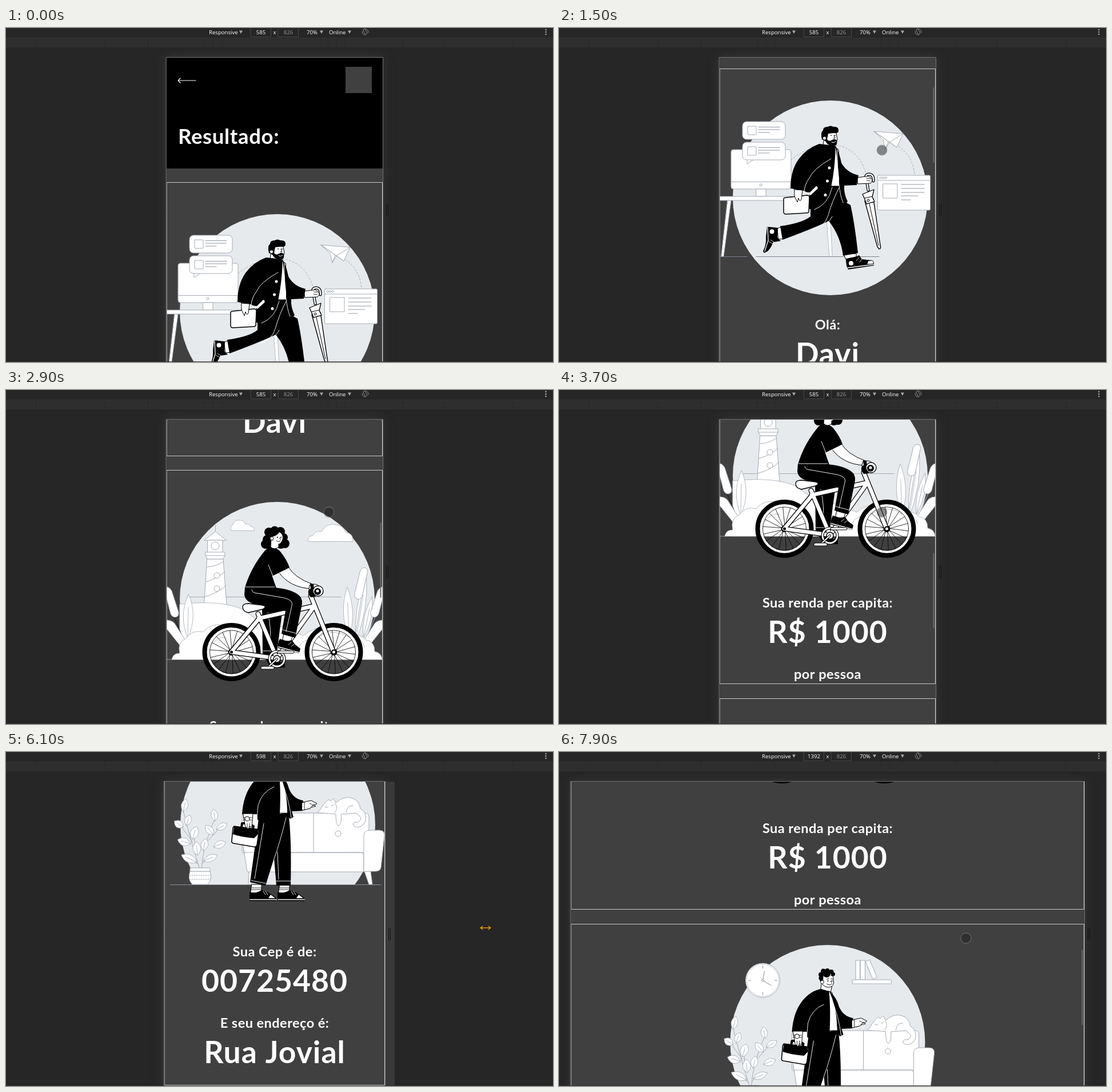
An HTML page with a canvas that plays this animation: 957x585 px, repeating every 8 s.

```html
<!DOCTYPE html>
<html lang="pt">
<head>
<meta charset="utf-8">
<title>Resultado</title>
<style>
html, body { margin: 0; width: 100%; height: 100%; overflow: hidden; background: #262626; }
canvas { display: block; width: 957px; height: 585px; }
</style>
</head>
<body>
<canvas id="stage" width="957" height="585"></canvas>
<script>
const ctx = document.getElementById('stage').getContext('2d');
const LOOP = 8000, MID = 470, TOP = 51, PAGE = '#404040', DESK = '#262626';
const PALE = '#e7eaed', WHITE = '#fff', BLACK = '#000', EDGE = '#a5abb5';

// [time, value...] keys
const scrollKeys = [[1100, 0], [1200, 25], [1500, 199], [1700, 282], [1900, 282], [2000, 330], [2100, 365],
  [2200, 365], [2300, 430], [2700, 665], [2800, 665], [2900, 714], [3100, 820], [3500, 892], [3600, 892],
  [3700, 930], [3900, 1075], [4000, 1075], [4100, 1145], [4400, 1425], [4600, 1425], [4700, 1494], [4900, 1569]];
const wideScrollKeys = [[7400, 1511], [7500, 1465], [7700, 1290], [7900, 1131]];
const widthKeys = [[5900, 585], [6000, 590], [6100, 598], [6200, 690], [6500, 1060], [6800, 1354], [7000, 1375], [7300, 1392]];
const cursorKeys = [[200, 362, 575], [400, 410, 420], [700, 600, 90], [1000, 565, 214], [5200, 565, 214], [5500, 682, 308],
  [5900, 682, 308], [6000, 750, 308], [6100, 839, 308], [6400, 926, 308], [7300, 933, 308], [7400, 712, 326]];

function at(keys, t, i = 1) {
  if (t <= keys[0][0]) return keys[0][i];
  for (let k = 1; k < keys.length; k++) {
    const a = keys[k - 1], b = keys[k];
    if (t <= b[0]) return a[i] + (b[i] - a[i]) * (t - a[0]) / (b[0] - a[0]);
  }
  return keys[keys.length - 1][i];
}

const paths = new Map();
function ink(d, fill, stroke, w = 1) {
  if (!paths.has(d)) paths.set(d, new Path2D(d));
  paint(paths.get(d), fill, stroke, w);
}
function paint(p, fill, stroke, w = 1) {
  if (fill) { ctx.fillStyle = fill; ctx.fill(p); }
  if (stroke) { ctx.strokeStyle = stroke; ctx.lineWidth = w; ctx.stroke(p); }
}
function dot(x, y, r, fill, stroke, w) {
  const p = new Path2D();
  p.arc(x, y, r, 0, 7);
  paint(p, fill, stroke, w);
}
function box(x, y, w, h, r, fill, stroke, lw) {
  const p = new Path2D();
  p.roundRect(x, y, w, h, r);
  paint(p, fill, stroke, lw);
}
function rect(x, y, w, h, c) { ctx.fillStyle = c; ctx.fillRect(x, y, w, h); }
function text(s, x, y, size, { color = WHITE, font = 'Lato', weight = 700, align = 'center', spacing = .018 } = {}) {
  ctx.font = `${weight} ${size}px ${font}, sans-serif`;
  ctx.letterSpacing = `${size * spacing}px`;
  ctx.fillStyle = color;
  ctx.textAlign = align;
  ctx.fillText(s, x, y);
}
function disc(y, floor) {
  ctx.save();
  ctx.beginPath();
  ctx.rect(280, y - 180, 400, floor - y + 180);
  ctx.clip();
  dot(474.5, y, 170.5, PALE);
  ctx.restore();
}
function leaf(x, y, len, wide, deg) {
  ctx.save();
  ctx.translate(x, y);
  ctx.rotate(deg * Math.PI / 180);
  const p = new Path2D(`M0 0Q${-wide} ${-len * .5} 0 ${-len}Q${wide} ${-len * .5} 0 0V${-len * .7}`);
  paint(p, WHITE, EDGE, .8);
  ctx.restore();
}

function runner() {
  disc(297.5, 480);
  ctx.setLineDash([3, 3]);
  ink('M406 231Q440 203 484 205Q526 212 538 258M594 207Q620 225 622 258', null, '#a2a6ab', .9);
  ctx.setLineDash([]);
  ink('M282 400.5H329M345 400.5H560', null, '#7b8190');
  ink('M468 334L473 400H478L475 335Z', WHITE, EDGE, .8);

  box(301, 213, 105, 69, 4, WHITE, EDGE);
  ink('M301 269.5H406', null, EDGE);
  dot(353, 275, 2, null, EDGE);
  box(345, 282, 17, 13, 0, WHITE, EDGE);
  ink('M295 302H301L288 400H284Z', WHITE, EDGE);
  box(281.5, 295, 125, 7, 1, WHITE, EDGE);
  ink('M329 230V238L341 230', WHITE, EDGE);
  for (const y of [164, 200]) {
    box(321, y, 75, 31, 7, WHITE, EDGE);
    box(330, y + 8, 15, 15, 1, null, EDGE);
    ink(`M349 ${y + 9.5}H386M349 ${y + 14}H386M349 ${y + 19}H368`, null, '#9097a5');
  }

  ink('M551 181L602 185L591 209L578 200L571 212L567 196Z', WHITE, EDGE);
  ink('M551 181L578 200L602 185M551 181L591 209M571 212L576 199', null, EDGE);

  box(557.5, 258, 92, 61, 2, WHITE, EDGE);
  ink('M558 267H649', null, EDGE);
  for (const x of [562.5, 567, 571.5]) dot(x, 262.5, 1.7, null, EDGE);
  box(567, 273, 25, 25, 0, null, EDGE);
  ink('M599 274H639M599 281H639M599 288H639M599 294H628M599 301H615', null, '#9097a5');

  // umbrella
  ink('M541 284L538 266Q534 257 542 256Q551 256 550 268', null, BLACK, 5);
  ink('M541 284L538 266Q534 257 542 256Q551 256 550 268', null, WHITE, 2.4);
  ink('M535 303L550 299L562 380Q564 387 560 387L557 383Z', WHITE, BLACK, 1.4);
  ink('M531 291L551 283L548 296L552 304L538 308L535 300Z', WHITE, BLACK, 1.3);
  ink('M535 298L548 295M543 308L559 381', null, BLACK);
  dot(541, 302, 2, WHITE, BLACK);
  ink('M522 262L537 260Q541 258 545 262Q551 267 545 272L523 273Z', WHITE, BLACK);
  ink('M538 263L545 264M538 267L545 268', null, BLACK, .8);

  // legs and shoes
  ink('M382 351L390 348L394 369L384 370Z', WHITE, BLACK);
  ink('M364 348L383 350L382 367L388 373L375 375Q371 385 365 391L359 394L357 391Q363 380 362 366Z', BLACK);
  ink('M365 349L366 372L360 391', null, WHITE, 1.3);
  ink('M367 374L374 378M370 371L376 375', null, WHITE, .8);
  dot(372.5, 356.5, 4, WHITE);
  ink('M499 397L520 395V402L502 405Z', WHITE, BLACK);
  ink('M502 404L521 400L525 398L530 405L548 407Q552 411 551 416L506 423Q502 418 502 404Z', BLACK);
  ink('M505 420L551 414', null, WHITE, 1.5);
  ink('M541 408L548 407Q551 410 550 413L539 414Z', WHITE, BLACK, .8);
  ink('M525 402L520 408M530 404L526 410', null, WHITE, .8);
  dot(511, 412, 4, WHITE);
  ink('M440 315L471 276H493L491 288L499 304L510 310Q517 340 523 394L497 399Q493 365 472 338Q445 351 391 371L387 347Q425 342 440 330Z', BLACK);
  ink('M491 278Q478 302 471 328Q464 350 444 353M473 338L478 330', null, WHITE, .9);

  // head, coat
  ink('M464 192L462 205L479 209L485 200Z', WHITE, BLACK);
  ink('M466 184Q476 179 485 184L487 195L484 203Q472 207 465 196Z', WHITE, BLACK);
  ink('M460 195Q457 183 462 179Q462 173 470 173Q475 170 480 173Q489 172 489 179Q490 185 481 184L471 185L469 195Q472 200 478 196Q483 193 486 197Q488 207 479 207Q470 206 466 198Z', BLACK);
  dot(464.5, 193, 3, WHITE, BLACK, .8);
  ink('M477 200Q481 202 484 199', null, WHITE);
  ink('M475 188H477M482 188H484M481 188L483 193H480', null, BLACK);
  ink('M482 208L489 213Q493 245 491 277H476Z', WHITE, BLACK);
  ink('M455 203Q469 204 484 207Q483 245 476 279Q468 312 446 319Q438 319 436 313Q437 297 439 288Q432 288 428 285L405 281Q405 250 419 230Q433 211 455 203Z', BLACK);
  ink('M484 206Q491 220 494 236Q503 253 524 258Q522 268 521 275L499 276Q498 290 505 304Q500 310 494 307Q489 290 490 263Z', BLACK);
  ink('M476 229Q444 247 438 263Q430 273 429 286M478 279Q471 309 447 318M487 214Q487 283 497 306', null, WHITE, .9);
  ink('M437 290L450 277Q454 278 452 282L440 293Z', WHITE);
  for (const [x, y] of [[473, 245], [469.5, 268], [466, 292.5]]) dot(x, y, 2.5, WHITE);

  ink('M393 300Q393 297 397 297L434 293Q438 293 438 297L437 321Q437 324 433 324L397 326Q393 326 393 322Z', WHITE, BLACK, 1.5);
  ink('M412 283L426 284L424 300Q421 306 419 298L417 305L414 299Q411 295 412 283Z', WHITE, BLACK);
}

function wheel(x) {
  const y = 459;
  dot(x, y, 47, null, BLACK, 8);
  dot(x, y, 40.5, null, WHITE, 4);
  dot(x, y, 38, null, BLACK, .8);
  for (let i = 0; i < 18; i++) {
    const a = i * Math.PI / 9 + .1, b = a + (i % 2 ? .14 : -.14);
    ink(`M${x + 6 * Math.cos(b)} ${y + 6 * Math.sin(b)}L${x + 38 * Math.cos(a)} ${y + 38 * Math.sin(a)}`, null, BLACK, .8);
  }
  dot(x, y, 6, BLACK);
}
function reeds(flip) {
  ctx.save();
  if (flip) { ctx.translate(940, 0); ctx.scale(-1, 1); }
  ink('M293 395L312 440M287 405L308 452', null, flip ? EDGE : '#111', 1);
  ink('M276 344Q286 344 290 352L302 389Q303 398 295 398Q290 397 288 392Z', WHITE, EDGE);
  ink('M276 403Q290 402 295 409L313 437L308 452L280 417Z', WHITE, EDGE);
  ctx.restore();
}
function cyclist() {
  disc(366.5, 472);
  ink('M318 362.5H586', null, '#a5abb3');
  ink('M394 246Q391 239 397 236Q399 227 409 228Q417 228 419 235Q426 233 428 239Q436 240 434 246Z', WHITE, EDGE, .8);
  ink('M529 265Q526 256 537 255Q540 246 552 248Q561 232 576 236Q590 236 594 249Q608 251 607 265Z', WHITE, EDGE, .8);
  ink('M366.5 237V248M347 263L366.5 248L385 263Z', WHITE, EDGE);
  box(353, 263, 26, 23, 0, WHITE, EDGE);
  dot(366, 273, 7, null, EDGE);
  ink('M352 296H380L386 376H347Z', WHITE, EDGE);
  ink('M352 310Q368 309 381 300M350 336Q372 329 383 318M348 362Q373 355 385 342', null, EDGE);
  dot(369, 325, 5, WHITE, EDGE);
  dot(369, 348, 5, WHITE, EDGE);
  ink('M349 284H383V290L380 296H352L349 290Z', WHITE, EDGE);
  ink('M349 290H383', null, EDGE);
  ink('M304 375Q380 367 418 386Q440 408 475 412L520 430Q560 400 606 429L625 472H304Z', WHITE, EDGE, .8);

  leaf(600, 435, 90, 16, -2);
  leaf(612, 440, 118, 14, 9);
  leaf(318, 435, 78, 17, 1);
  leaf(625, 435, 75, 12, 12);
  ink('M622 362L612 425', null, EDGE);
  ink('M620 316Q624 309 630 312Q634 315 632 321L623 362Q619 369 612 365Q609 362 610 356Z', WHITE, EDGE);
  reeds(false);
  reeds(true);
  ink('M290 472Q292 461 304 461Q299 442 315 435Q326 419 345 424Q360 405 390 414Q420 420 440 445L470 472Z', WHITE, EDGE, .8);
  ink('M658 472Q657 460 645 458Q645 440 630 438Q617 423 600 433Q570 415 545 435Q518 434 510 455Q483 455 475 472Z', WHITE, EDGE, .8);
  ink('M281 472H290M360 446Q372 430 386 434M607 434Q624 434 627 450', null, EDGE, .8);

  wheel(394.5);
  wheel(573.5);

  // far leg
  ink('M448 378L484 384L479 420L474 460L478 476L488 480V486H463L449 462Z', BLACK);
  ink('M458 390Q465 420 462 452M450 457H472', null, WHITE, .9);

  const frame = 'M443 400L394 459L474 470L441 392M442 400L540 378L474 470';
  for (const [c, w] of [[BLACK, 9], [WHITE, 6.5]]) {
    ink(frame, null, c, w);
    ink('M533 360L573 459', null, c, w);
  }
  dot(573.5, 459, 3.5, WHITE, BLACK, 2);
  dot(394.5, 459, 2.5, BLACK);
  ink('M414 380Q414 374 424 374L450 377Q457 379 449 384L424 390Q414 388 414 380Z', WHITE, BLACK, 1.3);
  dot(474, 471, 13, null, BLACK, 5);
  dot(474, 471, 13, null, WHITE, 2.8);
  dot(474, 471, 6, WHITE, BLACK, 1.5);
  ink('M474 471L459 485', null, BLACK, 4);
  ink('M474 471L459 485', null, WHITE, 2);
  box(446, 484, 23, 5, 2, WHITE, BLACK);

  // near leg
  ink('M486 428L501 432L498 441L484 439Z', WHITE, BLACK);
  ink('M479 436L486 438Q492 441 500 438L506 446L515 453L513 461L476 452Q475 443 479 436Z', BLACK);
  ink('M477 450L514 460', null, WHITE, 1.6);
  ink('M494 446L499 442M499 449L504 445', null, WHITE, .8);
  box(475, 457, 29, 4, 2, WHITE, BLACK);
  ink('M418 345L470 346Q502 349 514 361Q520 367 517 380L506 434L482 427L489 387Q464 384 445 376Q420 375 417 359Z', BLACK);
  ink('M430 350Q431 356 440 356L486 364Q504 368 500 378L490 423M484 420L507 426', null, WHITE, .9);

  // arm, handlebar, top
  ink('M494 310Q505 329 536 340L534 348Q496 346 477 319Z', WHITE, BLACK);
  ink('M532 341Q544 338 548 344L552 352L541 357L530 349Z', WHITE, BLACK);
  ink('M529 352Q530 347 537 348L542 362L533 363Q528 358 529 352Z', BLACK);
  ink('M532 339L538 340L539 349L533 348Z', BLACK);
  dot(546, 352, 9, WHITE, BLACK, 1.3);
  dot(545, 353, 6, BLACK);
  dot(545, 352, 2.5, WHITE);
  ink('M455 279Q470 272 480 283Q492 298 496 311L466 326L464 321L473 347L418 346Q429 309 455 279Z', BLACK);
  ink('M467 326L459 306M467 326L495 313M419 345H470', null, WHITE, .9);

  for (const [x, y, r] of [[460, 249, 8], [470, 246, 7.5], [480, 248, 8], [457, 262, 8], [454, 270, 8], [460, 271, 8],
    [486, 258, 7], [488, 269, 8], [481, 270, 8], [468, 262, 12]]) dot(x, y, r, BLACK);
  ink('M464 262L463 275Q470 281 477 275L477 268Z', WHITE, BLACK);
  ink('M466 257Q475 255 478 249Q484 251 484 260Q482 270 474 270Q467 268 466 257Z', WHITE);
  dot(465, 260, 3, WHITE, BLACK, .8);
  dot(475, 258, 1, BLACK);
  dot(481, 258, 1, BLACK);
  ink('M473 264Q477 267 480 264M479 259L480 262', null, BLACK, .9);
}

function walker() {
  disc(202.5, 308);
  ink('M286 307.5H655', null, '#8b9097');
  dot(361, 94, 30, WHITE, EDGE);
  dot(361, 94, 28, null, EDGE, .6);
  ink('M361 94L364 78M361 94L376 103M361 69V73M361 115V119M336 94H340M382 94H386', null, '#8b9097');
  dot(361, 94, 2, WHITE, '#8b9097');
  box(524, 59, 7, 34, 0, WHITE, EDGE);
  box(532, 59, 8, 34, 0, WHITE, EDGE);
  ink('M541 61L548 58L561 89L554 92Z', WHITE, EDGE);
  box(518, 93, 68, 7, 0, WHITE, EDGE);

  // plant
  ink('M338 280Q325 240 309 178M341 280Q343 240 365 190M336 272L312 258M343 270L358 256M342 242L378 202M325 232L303 202M330 248L328 218', null, EDGE);
  for (const a of [[309, 180, 24, 12, 12], [309, 207, 19, 13, -55], [314, 204, 20, 12, 20], [325, 228, 24, 14, 18], [322, 236, 24, 14, -72],
    [334, 256, 24, 14, -5], [333, 268, 30, 14, -65], [344, 266, 27, 12, 68], [344, 248, 22, 13, 12], [362, 241, 23, 13, 70],
    [362, 220, 22, 13, -40], [367, 211, 22, 12, 60], [365, 196, 21, 12, -8]]) leaf(...a);
  ink('M321 284H356Q361 298 352 307H325Q316 298 321 284Z', WHITE, EDGE);
  box(321, 278, 35, 6, 1, WHITE, EDGE);
  ctx.setLineDash([2, 2]);
  ink('M320 291H357M320 298H357', null, EDGE);
  ctx.setLineDash([]);

  // sofa and cat
  ink('M626 284L634 307H640L637 284ZM432 284L428 307H423L424 284Z', WHITE, EDGE);
  box(412, 182, 222, 72, 6, WHITE, EDGE);
  ink('M414 240L421 285H625V251H415Z', WHITE, EDGE);
  ink('M537 182V250M497 251H620Q626 252 625 260V278', null, EDGE);
  ink('M625 284V222Q625 212 635 212H652Q662 212 661 222L655 277Q654 284 646 284Z', WHITE, EDGE);
  dot(580, 218, 5, WHITE, EDGE);
  ink('M544 181Q550 176 552 170L557 164L563 158L567 161L572 156L576 164Q590 151 605 156Q617 160 619 174Q631 181 628 196Q622 209 610 206Q603 202 609 198Q619 199 620 190L612 182L585 184Q587 199 581 205Q576 203 576 184Z', WHITE, EDGE);
  ink('M575 165Q581 174 574 181M594 181Q595 168 606 169M557 171L562 172M568 169L572 168', null, EDGE);

  // shoes and trousers
  for (const x of [0, 49]) {
    ink(`M${429 + x} 307H${446 + x}V322H${427 + x}Z`, WHITE, BLACK);
    ink(`M${428 + x} 313H${446 + x}M${428 + x} 316H${446 + x}`, null, BLACK, .8);
    ink(`M${425 + x} 320Q${435 + x} 324 ${446 + x} 317L${456 + x} 320L${470 + x} 329Q${473 + x} 332 ${472 + x} 336H${425 + x}Z`, BLACK);
    ink(`M${426 + x} 333.5H${472 + x}`, null, WHITE, 1.5);
    ink(`M${462 + x} 325L${470 + x} 331H${458 + x}Z`, WHITE);
    ink(`M${449 + x} 319L${453 + x} 325M${453 + x} 319L${457 + x} 325`, null, WHITE, .9);
  }
  ink('M441 192L493 180Q499 225 497 309H472L468 261L453 309L426 303Q434 245 441 192Z', BLACK);
  ink('M489 190Q478 235 468 262M450 200L434 297M474 250L476 298M428 300L453 305M472 301H497', null, WHITE, .9);

  // jacket
  ink('M464 96L462 112L479 117L482 105Z', WHITE, BLACK);
  ink('M476 113L482 115Q492 145 492 182H476Z', WHITE, BLACK);
  ink('M463 109L477 113Q480 145 478 184Q477 194 474 195Q453 198 439 194L438 184L412 184Q414 151 430 130Q445 112 463 109Z', BLACK);
  ink('M477 112Q491 125 494 139Q501 157 519 160L518 178L499 179L502 189L496 192Q491 188 491 175Q490 140 477 112Z', BLACK);
  ink('M468 136Q446 145 440 169L438 192M478 117Q495 160 498 190', null, WHITE, .9);
  ink('M517 164L523 162L533 160L543 165Q543 167 536 168L531 174L517 177Z', WHITE, BLACK);
  ink('M530 165L541 170L533 172M521 162V176', null, BLACK, .8);

  // bag
  ink('M411 207L412 200Q422 199 432 205L431 211', null, BLACK, 4);
  ink('M398 205L437 210Q442 211 441 217L438 238Q437 242 432 241L397 235Q393 234 394 230L396 208Z', WHITE, BLACK, 1.6);
  ink('M398 205L437 210Q441 212 440 219L433 226Q410 224 396 219Z', BLACK);
  ink('M414 183H431L429 207L425 205L423 210L418 206Z', WHITE, BLACK);
  ink('M414 190H429M414 194H429M421 200V208M425 200V207', null, BLACK, .8);
  dot(421, 192, 4, WHITE, BLACK);

  // head
  ink('M465 88Q476 81 484 87L485 99Q483 107 474 106Q465 104 463 96Z', WHITE, BLACK);
  for (const [x, y, r] of [[463, 90, 4], [463, 84, 4.5], [467, 78, 4.5], [474, 77, 4], [481, 79, 4], [484, 83, 3.5], [473, 83, 6], [464, 94, 3]]) dot(x, y, r, BLACK);
  dot(465, 97, 3, WHITE, BLACK, .8);
  dot(475, 95, 1, BLACK);
  dot(482, 95, 1, BLACK);
  ink('M473 100Q478 104 482 100M480 95L481 98M473 92L477 91M480 91L483 92', null, BLACK, .9);
}

// shift: distance from the art's own coordinates to its card top; text rows: [string, baseline, size]
const SMALL = 23.6, LARGE = 53.5;
const cards = [
  { height: 559, shift: 71, art: runner, rows: [['Olá:', 456.5, SMALL], ['Davi', 519, LARGE]] },
  { height: 590, shift: 140, art: cyclist, rows: [['Sua renda per capita:', 456.5, SMALL], ['R$ 1000', 519, LARGE], ['por pessoa', 581.5, SMALL]] },
  { height: 682, shift: -24, art: walker, rows: [['Sua Cep é de:', 456.5, SMALL], ['00725480', 519, LARGE], ['E seu endereço é:', 581.5, SMALL], ['Rua Jovial', 644, LARGE]] }
];

function page(left, right, width, scroll) {
  const wide = width > 600, lift = wide ? 19 : 0, dx = wide ? -4.5 : width > 590 ? 1 : 0;
  rect(left, 52 - scroll, right - left, 194, BLACK);
  ink(`M332 ${92 - scroll}H301M305 ${88 - scroll}L301 ${92 - scroll}L305 ${96 - scroll}`, null, WHITE, 1.2);
  rect(right - 65, 68 - scroll, 46, 46, PAGE);
  text('Resultado:', left + 20, 203 - scroll, 36.5, { align: 'left' });

  let y = 270;
  for (const { height, shift, art, rows } of cards) {
    const top = Math.floor(y) - Math.round(scroll), h = height - lift;
    if (top < 585 && top + h > TOP) {
      ctx.save();
      ctx.translate(dx, top - lift - shift);
      art();
      ctx.restore();
      for (const [s, base, size] of rows) text(s, MID, top - lift + base, size);
      ctx.strokeStyle = '#c9c9c9';
      ctx.lineWidth = 1;
      ctx.strokeRect(left + .5, top + .5, right - left - 1, h);
    }
    y += h + 25.5;
  }
}

function toolbar(width) {
  rect(0, 0, 957, 18, DESK);
  rect(0, 18, 957, 16, '#2e2e2e');
  rect(0, 17, 957, 1, '#333');
  for (const x of [52, 173, 248, 347, 362, 377, 563, 578, 593, 693, 766, 887]) rect(x, 19, 1, 14, '#272727');
  const ui = { font: 'Open Sans', weight: 400, spacing: 0 }, start = { ...ui, align: 'left' };
  text('Responsive', 355, 11, 9.6, start);
  text('70%', 526, 11, 9.6, start);
  text('Online', 565, 11, 9.6, start);
  for (const x of [411, 552, 601]) ink(`M${x - 3} 4.5H${x + 3}L${x} 10Z`, '#a8a8a8');
  for (const x of [428, 476]) box(x + .5, -.5, 35, 16, 0, null, '#484848');
  text(String(Math.round(width)), 446, 11, 9.6, ui);
  text('x', 470, 11, 9.6, ui);
  text('826', 494, 11, 9.6, { ...ui, color: '#969696' });
  ink('M625 3L628 1L632 9L629 12ZM623 6Q623 11 627 12M634 8Q634 3 630 2', null, '#8f8f8f');
  for (const dy of [3, 7, 11]) dot(944.5, dy, 1.3, '#a8a8a8');
}

function pointer(t) {
  if (t < 200) return;
  const x = at(cursorKeys, t, 1), y = at(cursorKeys, t, 2);
  if (t >= 5500 && t < 7400) {
    const p = new Path2D(`M${x - 8} ${y}H${x + 8}M${x - 5} ${y - 3}L${x - 9} ${y}L${x - 5} ${y + 3}M${x + 5} ${y - 3}L${x + 9} ${y}L${x + 5} ${y + 3}`);
    paint(p, null, '#111', 3);
    paint(p, null, '#f2a321', 1.4);
  } else {
    dot(x, y, 9, 'rgba(30,30,30,.5)', 'rgba(150,150,150,.45)', 1.3);
  }
}

function draw(t) {
  const width = at(widthKeys, t), half = width * .6455 / 2;
  const left = Math.round(MID - half), right = Math.round(MID + half);
  const wide = width > 600, scroll = wide ? at(wideScrollKeys, t) : at(scrollKeys, t);
  ctx.lineJoin = ctx.lineCap = 'round';
  rect(0, 0, 957, 585, DESK);

  ctx.save();
  ctx.shadowColor = '#3a3a3a';
  ctx.shadowBlur = 17;
  rect(left, TOP, right - left, 600, PAGE);
  ctx.restore();
  if (t >= 5700 && t < 7400) rect(right + 1, 52, 16, 533, '#393939');
  for (const x of [6, 9]) rect(right + x, 308, 1, 22, '#141414');

  ctx.save();
  ctx.beginPath();
  ctx.rect(left, TOP, right - left, 533);
  ctx.clip();
  page(left, right, width, scroll);
  if ((t >= 1200 && t < 5400) || t >= 7500) {
    const max = wide ? 1511 : 1569;
    box(right - 4.5, 54.7 + 389.4 * scroll / max, 2, 132, 1, '#6c6c6c');
  }
  ctx.restore();

  ctx.strokeStyle = '#737373';
  ctx.lineWidth = 1;
  ctx.strokeRect(left - .5, TOP + .5, right - left + 1, 600);
  rect(0, 584, 957, 1, '#303030');
  toolbar(width);
  pointer(t);
}

function tick(now) {
  draw(Math.floor(now % LOOP / 100) * 100);
  requestAnimationFrame(tick);
}
draw(0);
requestAnimationFrame(tick);
</script>
</body>
</html>
```
